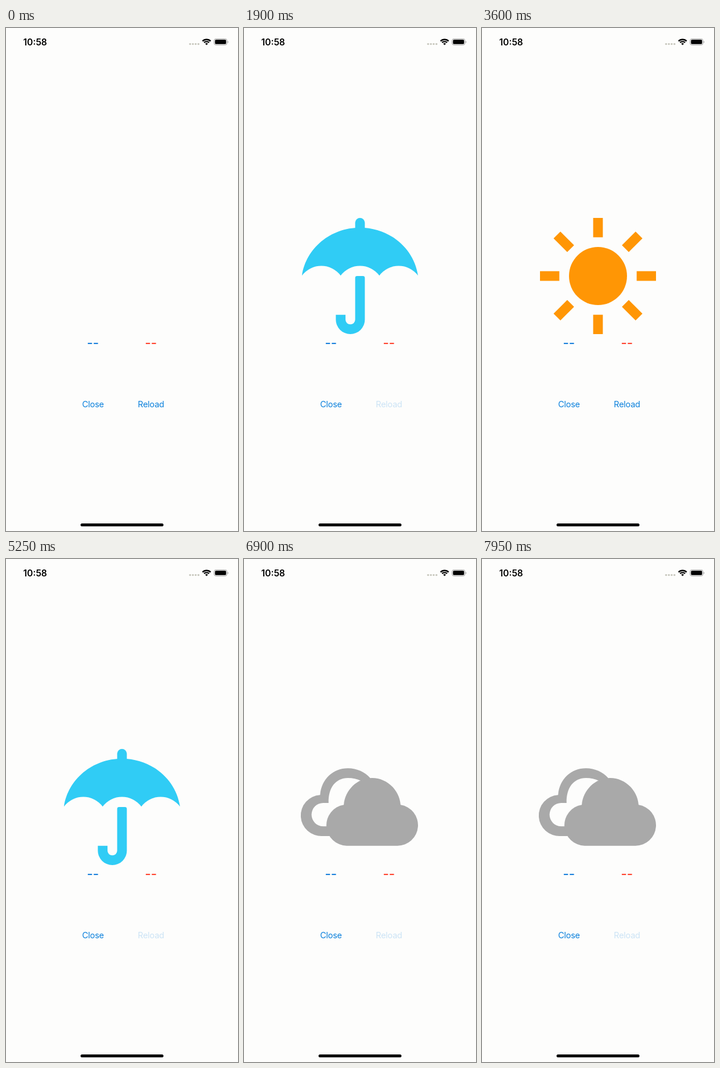
An HTML page for the animation above (8 s loop, 400 px wide and 866 px high).

```html
<!DOCTYPE html>
<html lang="en">
<head>
<meta charset="utf-8">
<title>Weather</title>
<style>
  html, body { margin: 0; width: 100%; height: 100%; overflow: hidden; background: #fdfdfc; }
  svg { display: block; width: 100%; height: 100%; }
  text { font-family: Inter, Roboto, sans-serif; text-anchor: middle; }
  .button { font-size: 14.4px; letter-spacing: -.2px; fill: #0a80dc; }
  .temp { font-size: 22.5px; font-weight: 500; }
  .icon { visibility: hidden; }
</style>
</head>
<body>
<svg viewBox="0 0 400 866">
  <!-- status bar -->
  <text x="50.3" y="29.6" font-size="15.4" font-weight="600">10:58</text>
  <g fill="#c6c6bc">
    <circle cx="317.4" cy="27.6" r="1.7"/><circle cx="322.2" cy="27.6" r="1.7"/>
    <circle cx="327" cy="27.6" r="1.7"/><circle cx="331.8" cy="27.6" r="1.7"/>
  </g>
  <g transform="translate(345.8 29.5)">
    <path d="M-6.93-6.93A9.8 9.8 0 0 1 6.93-6.93M-4.31-4.31A6.1 6.1 0 0 1 4.31-4.31" fill="none" stroke="#000" stroke-width="2.4"/>
    <path d="M0 0L-2.4-2.4A3.4 3.4 0 0 1 2.4-2.4Z"/>
  </g>
  <rect x="358.7" y="18.5" width="22.4" height="10.9" rx="3.4" fill="none" stroke="#a6a6a6"/>
  <rect x="360.3" y="20.1" width="19.2" height="7.7" rx="1.9"/>
  <path d="M382.2 22.2q1.3.4 1.3 1.8t-1.3 1.8z" fill="#a6a6a6"/>

  <!-- weather icons on a 24 unit grid -->
  <g transform="translate(100 327) scale(8.3333)">
    <g class="icon" id="rain" fill="#30ccf5">
      <path d="M11 3V1a1 1 0 0 1 2 0V3Z"/>
      <path d="M24 11.9C23.18 6.25 18.08 2 12 2S.82 6.25 0 11.9A5 5 0 0 1 8 11.9A5 5 0 0 1 16 11.9A5 5 0 0 1 24 11.9Z"/>
      <path d="M11 12.4q0-.4.4-.4h1.2q.4 0 .4.4V21a3 3 0 0 1-6 0V20H9V21a1 1 0 0 0 2 0Z"/>
    </g>
    <g class="icon" id="sun" fill="#ff9605">
      <circle cx="12" cy="12" r="6"/>
    </g>
    <g class="icon" id="cloud" fill="#a9a9a9">
      <path fill-rule="evenodd" d="M6.5 18H4.25A4.25 4.25 0 0 1 3.75 9.5C4 6.2 6.5 4 9.5 4C11.4 4 13 4.8 14.1 6L14 10L8 18Z
        M8 16H4.4A2.42 2.42 0 0 1 4.4 11.15H5.5C5.4 8 7 6 9.5 6C10.5 6 11.4 6.2 12.2 6.6L12 10Z"/>
      <path d="M9.25 20A4.25 4.25 0 0 1 8.65 11.55C8.9 8.5 11.4 6 14.5 6S20.15 8.5 20.4 11.55A4.25 4.25 0 0 1 19.75 20Z"/>
    </g>
  </g>

  <text class="temp" x="149.8" y="549.8" fill="#1a80dc">--</text>
  <text class="temp" x="249.8" y="549.8" fill="#ff4530">--</text>
  <text class="button" x="150" y="653">Close</text>
  <text class="button" id="reload" x="250" y="653">Reload</text>
  <rect x="128.5" y="853" width="143" height="5" rx="2.5"/>
</svg>
<script>
  const LOOP = 8000, STEP = 50, FADE = 500, DIM = 0.2;
  // press time, release time, icon shown on release
  const taps = [
    [500, 650, 'rain'], [1900, 2050, 'sun'], [2950, 3100, 'sun'], [4100, 4250, 'rain'],
    [5100, 5250, 'rain'], [6000, 6200, 'cloud'], [6900, 7150, 'cloud'], [7900, LOOP, 'cloud']
  ];
  const get = id => document.getElementById(id);
  const ease = p => p * p * (3 - 2 * p);

  for (let i = 0; i < 8; i++) {
    get('sun').insertAdjacentHTML('beforeend',
      `<rect x="11" width="2" height="4" transform="rotate(${i * 45} 12 12)"/>`);
  }

  function draw(t) {
    let icon = '', opacity = 1;
    for (const [press, release, name] of taps) {
      if (t >= press) opacity = DIM;
      if (t >= release) {
        icon = name;
        opacity += (1 - DIM) * ease(Math.min(1, (t - release) / FADE));
      }
    }
    get('reload').style.opacity = opacity;
    for (const id of ['rain', 'sun', 'cloud']) {
      get(id).style.visibility = id === icon ? 'visible' : 'hidden';
    }
  }

  const start = performance.now();
  function frame() {
    const t = (performance.now() - start) % LOOP;
    draw(Math.floor(t / STEP) * STEP);
    requestAnimationFrame(frame);
  }
  frame();
</script>
</body>
</html>
```
